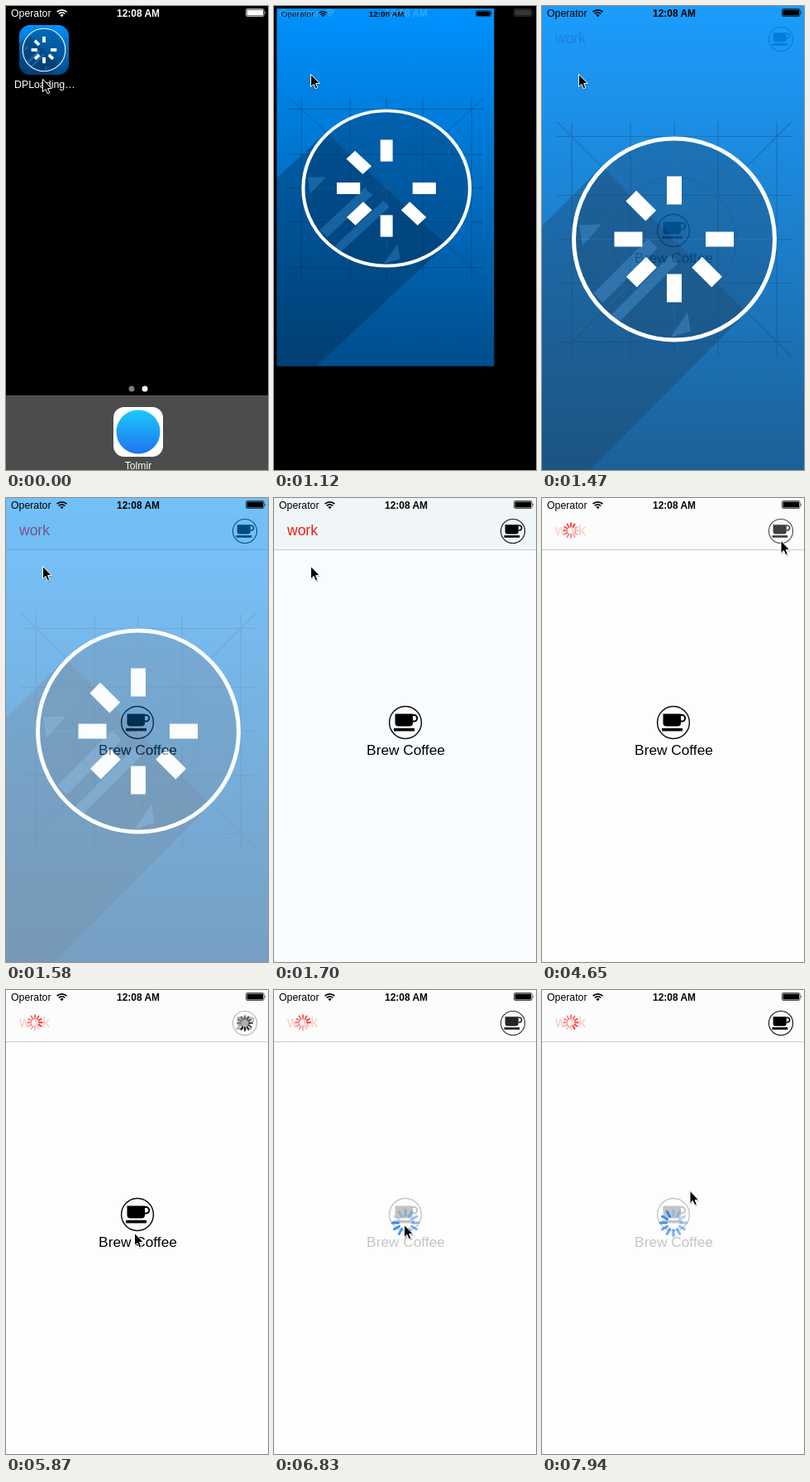
These frames come from a looping animation (317x560 px, 8000 ms). An HTML page:

```html
<!DOCTYPE html>
<html lang="en">
<head>
<meta charset="utf-8">
<title>Loading buttons</title>
<style>
  html, body { margin: 0; width: 100%; height: 100%; overflow: hidden; background: #000; }
  svg { display: block; width: 100vw; height: 100vh; }
  text { font-family: "Liberation Sans", Arial, sans-serif; }
</style>
</head>
<body>
<svg id="stage" viewBox="0 0 317 560" preserveAspectRatio="none"></svg>
<script>
const LOOP = 8000;
const stage = document.getElementById('stage');

// ---------- static parts ----------
const label = (x, y, size, text, fill, extra = '') =>
  `<text x="${x}" y="${y}" font-size="${size}" fill="${fill}" ${extra}>${text}</text>`;

const statusBar = color => `
  ${label(6, 12.6, 12.3, 'Operator', color)}
  ${label(160, 12.6, 11.9, '12:08 AM', color, 'text-anchor="middle" font-weight="bold"')}
  <g fill="none" stroke="${color}" stroke-width="1.7">
    <path d="M61.6 7.2a8.4 8.4 0 0 1 11.8 0"/>
    <path d="M63.8 9.5a5.2 5.2 0 0 1 7.4 0"/>
  </g>
  <path d="M65.4 11.1a3 3 0 0 1 4.2 0l-2.1 2.1z" fill="${color}"/>
  <rect x="290.5" y="3.5" width="21.5" height="9" rx="1.5" fill="none" stroke="${color}" stroke-opacity=".7"/>
  <rect x="291.5" y="4.5" width="19.5" height="7" rx=".6" fill="${color}"/>
  <path d="M313 6.3q1.6 1.7 0 3.4z" fill="${color}"/>`;

// Emblem centred on 0,0: [angle, centre radius] per bar, one bar missing
const bars = [[0, 59], [90, 55], [135, 56], [180, 59], [225, 56], [270, 55.5], [315, 57]]
  .map(([a, r]) => `<rect x="-9" y="${-r - 17}" width="18" height="34" transform="rotate(${a})"/>`)
  .join('');
const guides = [-124, -53, 0, 53, 124]
  .map(v => `M${v} -142V142M-142 ${v}H142`).join('') + 'M-142 -142L142 142M142 -142L-142 142';
const emblem = `
  <path d="M-88 -88L-588 412L-412 588L88 88z" fill="#00203c" fill-opacity=".3"/>
  <path d="${guides}" fill="none" stroke="#002a55" stroke-opacity=".38" stroke-width="1.2"/>
  <circle r="121" fill="#003a6c" fill-opacity=".42"/>
  <g stroke="#4aa4ea" stroke-opacity=".3" fill="none">
    <path d="M-26 5L-92 71" stroke-width="16"/>
    <path d="M0 24L-72 96" stroke-width="13"/>
  </g>
  <path d="M-115 -17L-88 -18L-111 8zM16 88L20 111L-4 118z" fill="#4aa4ea" fill-opacity=".3"/>
  <path d="M-121 0H121M0 -121V121M-86 -86L86 86M86 -86L-86 86" stroke="#9cc8ee" stroke-opacity=".16"/>
  <circle r="75" fill="none" stroke="#002a55" stroke-opacity=".25"/>
  <circle r="121.5" fill="none" stroke="#fff" stroke-width="5"/>
  <g fill="#fff">${bars}</g>`;

const cup = (x, y, k) => `
  <g transform="translate(${x} ${y}) scale(${k})">
    <circle r="19.4" fill="none" stroke="#111" stroke-width="1.5"/>
    <path d="M-12.5 -10.5H9V.5q0 4 -4 4H-8.5q-4 0 -4 -4z"/>
    <path d="M9 -9h1.4a3.4 3.4 0 0 1 0 7.6H9" fill="none" stroke="#000" stroke-width="2"/>
    <rect x="-14" y="6.8" width="25" height="3.6"/>
  </g>`;

const spinner = (id, x, y, inner, outer, width, color) => {
  let spokes = '';
  for (let i = 0; i < 12; i++)
    spokes += `<path d="M0 ${-inner}V${-outer}" transform="rotate(${i * 30})"/>`;
  return `<g id="${id}" transform="translate(${x} ${y})" stroke="${color}"
    stroke-width="${width}" stroke-linecap="round">${spokes}</g>`;
};

stage.innerHTML = `
  <defs>
    <linearGradient id="blue" x2="0" y2="1">
      <stop stop-color="#0092ff"/><stop offset="1" stop-color="#004d8b"/>
    </linearGradient>
    <linearGradient id="sky" x2="0" y2="1">
      <stop stop-color="#1ec8fb"/><stop offset="1" stop-color="#1d74f0"/>
    </linearGradient>
    <clipPath id="window"><rect id="frame"/></clipPath>
  </defs>
  <rect width="317" height="560" fill="#000"/>

  <g id="home">
    ${label(46.8, 98.6, 12.4, 'DPLoading…', '#fff', 'text-anchor="middle"')}
    <circle cx="152" cy="462" r="3.5" fill="#7c7c7c"/>
    <circle cx="168" cy="462" r="3.5" fill="#fff"/>
    <rect y="470" width="317" height="90" fill="#4c4c4c"/>
    <rect y="470" width="317" height="1" fill="#585858"/>
    <rect x="130" y="484" width="60" height="60" rx="13" fill="#fff"/>
    <circle cx="160" cy="514" r="26.5" fill="url(#sky)"/>
    ${label(160, 559.4, 12.2, 'Tolmir', '#fff', 'text-anchor="middle"')}
  </g>

  <g id="page">
    <rect id="body" width="317" height="560"/>
    <rect id="nav" width="317" height="62"/>
    <rect y="62" width="317" height="1" fill="#c9cccd"/>
    ${statusBar('#000')}
    <g id="work">${label(16, 45.4, 17.5, 'work', '#f51a10')}</g>
    <g id="brewSmall">${cup(289, 40, .75)}</g>
    <g id="brew">${cup(159, 271, 1)}
      ${label(159.5, 310, 17.3, 'Brew Coffee', '#000', 'text-anchor="middle"')}</g>
    ${spinner('workSpin', 35, 39.3, 5, 9, 1.9, '#f8302c')}
    ${spinner('smallSpin', 289, 40, 5, 9, 1.9, '#111')}
    ${spinner('brewSpin', 159, 281, 8.6, 15.6, 3, '#2f86f2')}
  </g>

  <g id="launch" clip-path="url(#window)">
    <g id="icon">
      <rect width="60" height="60" fill="url(#blue)"/>
      <g transform="translate(30 30) scale(.212)">${emblem}</g>
      <rect id="dim" width="60" height="60" fill="#000"/>
    </g>
    <g id="splash">
      <rect width="317" height="560" fill="url(#blue)"/>
      <g transform="translate(160 281.5)">${emblem}</g>
      ${statusBar('#000')}
    </g>
  </g>
  <g id="homeBar">${statusBar('#fff')}</g>

  <g id="cursor">
    <path d="M1 2V17.5L4.6 14.2L7 19.6L9.6 18.4L7.3 13.2H12z" fill="#000" fill-opacity=".22"/>
    <path d="M.5 .3V15.6L4 12.4L6.2 17.8L8.8 16.7L6.6 11.5H11.2z" fill="#000" stroke="#fff" stroke-width="1"/>
  </g>`;

// ---------- motion ----------
const el = {};
stage.querySelectorAll('[id]').forEach(node => el[node.id] = node);

const clamp = v => Math.min(1, Math.max(0, v));
const span = (t, from, to) => clamp((t - from) / (to - from));
const smooth = u => u * u * (3 - 2 * u);
const mix = (a, b, u) => a + (b - a) * u;
const set = (node, attrs) => {
  for (const key in attrs) node.setAttribute(key, attrs[key]);
};
const fade = (node, opacity) => {
  node.setAttribute('opacity', opacity);
  node.setAttribute('display', opacity > 0 ? 'inline' : 'none');
};

// time, x, y of the pointer tip
const route = [
  [0, 44, 88], [600, 44, 88], [800, 44, 82], [2120, 44, 82], [2520, 38, 47],
  [3690, 38, 47], [4410, 288.5, 51], [4850, 288.5, 51], [5650, 155, 293],
  [5900, 155, 293], [6100, 157, 283], [7060, 157, 283], [7820, 180, 243],
  [7940, 178.5, 242], [8000, 178.5, 242]
];

function pointer(t) {
  let i = 0;
  while (i < route.length - 2 && route[i + 1][0] <= t) i++;
  const [t0, x0, y0] = route[i], [t1, x1, y1] = route[i + 1];
  const u = smooth(span(t, t0, t1));
  return [mix(x0, x1, u), mix(y0, y1, u)];
}

function spin(node, t, from, to, offset) {
  const on = t >= from && t < to;
  fade(node, on ? span(t, from - 60, from + 120) : 0);
  if (!on) return;
  const head = Math.floor(t * 12 / 1000) + offset;
  [...node.children].forEach((spoke, i) => {
    const age = ((head - i) % 12 + 12) % 12;
    spoke.setAttribute('opacity', 1 - .75 * age / 11);
  });
}

function launch(t) {
  const p = 1 - (1 - span(t, 850, 1350)) ** 2;
  const x = 16 * (1 - p), y = 23 * (1 - p) ** 1.3;
  const w = mix(60, 317, p), h = mix(60, 560, p ** 1.26);
  const zoom = w / 60;
  set(el.frame, { x, y, width: w, height: h, rx: 13 * (1 - span(p, 0, .75)) });
  set(el.icon, { transform: `translate(${x} ${y}) scale(${zoom} ${h / 60})` });
  set(el.splash, { transform: `translate(${x} ${y}) scale(${w / 317} ${h / 560})` });
  set(el.home, { transform: `translate(${x} ${y}) scale(${zoom}) translate(-16 -23)` });
  fade(el.dim, .45 * span(t, 620, 700) * (1 - span(p, 0, .5)));
  fade(el.splash, span(p, 0, .45));
  fade(el.home, 1 - span(p, 0, .6));
  fade(el.homeBar, 1 - p);
  fade(el.launch, 1 - span(t, 1410, 1700) ** 1.4);
}

function draw(t) {
  launch(t);
  fade(el.page, t >= 1400 ? 1 : 0);
  const tinted = t < 2120;
  el.body.setAttribute('fill', tinted ? '#f8fbff' : '#fdfdfd');
  el.nav.setAttribute('fill', tinted ? '#f0f5f7' : '#fcfcfc');

  fade(el.work, mix(1, .22, span(t, 2870, 3200)));
  fade(el.brewSmall, mix(1, .3, span(t, 4530, 4860) - span(t, 6720, 6860)));
  fade(el.brew, mix(1, .22, span(t, 6230, 6560)));
  spin(el.workSpin, t, 3290, LOOP, 6);
  spin(el.smallSpin, t, 4920, 6760, 9);
  spin(el.brewSpin, t, 6640, LOOP, 0);

  const [x, y] = pointer(t);
  set(el.cursor, { transform: `translate(${x} ${y})` });
}

function tick() {
  draw(performance.now() % LOOP);
  requestAnimationFrame(tick);
}
tick();
</script>
</body>
</html>
```
